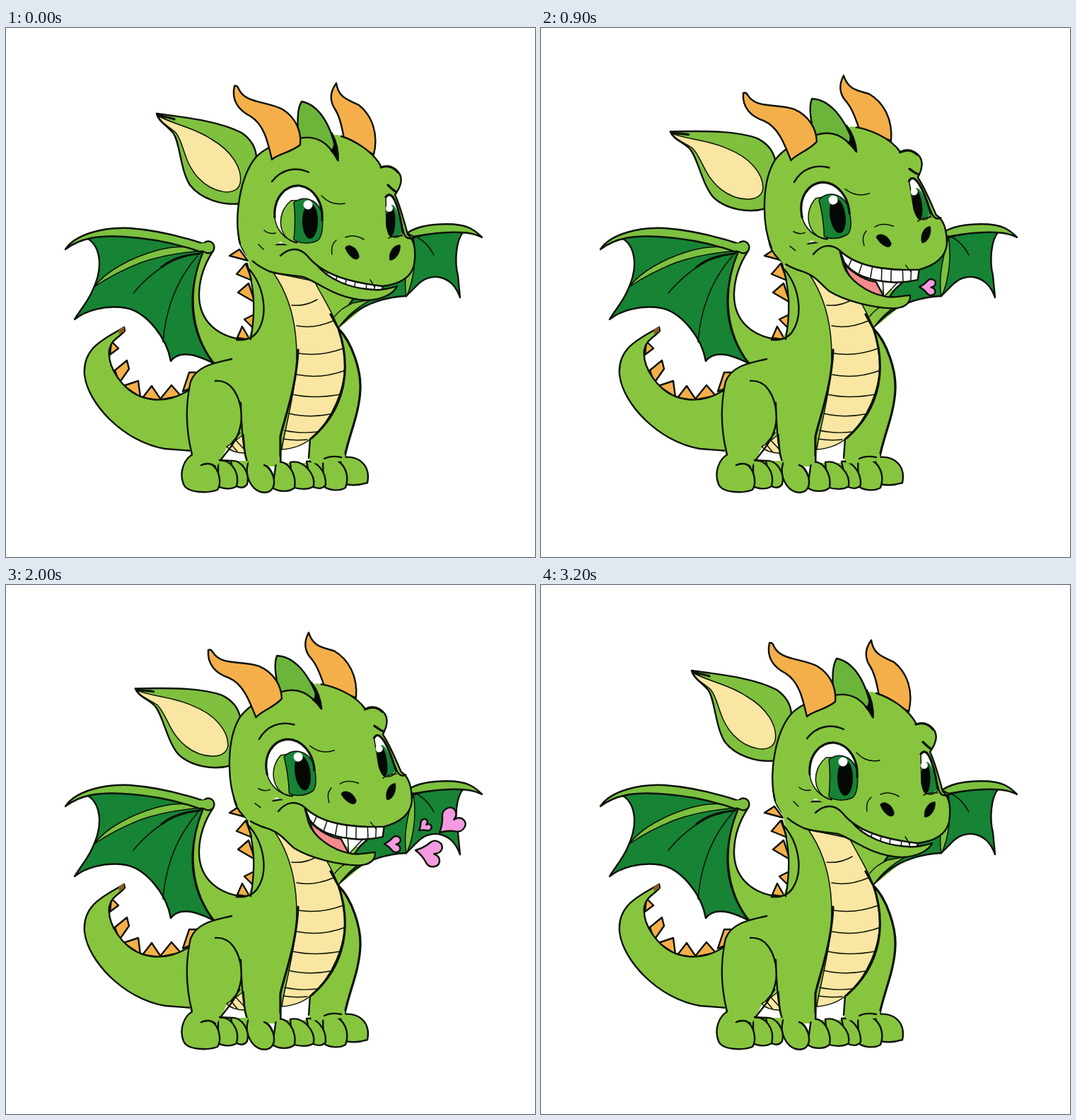
Animation of 748 by 748 pixels, one loop 3310 ms. Source, as an HTML page:

```html
<!DOCTYPE html>
<html lang="en">
<head>
<meta charset="utf-8">
<title>Little dragon</title>
<style>
  html, body { margin: 0; width: 100%; height: 100%; overflow: hidden; background: #fff; }
  svg { display: block; width: 100vw; height: 100vh; }
  path, circle, ellipse { stroke: #0c1207; stroke-width: 2.4; stroke-linejoin: round; stroke-linecap: round; }
  .skin { fill: #87c53f; }
  .rim { fill: #7cc140; }
  .ear { fill: #7fc03e; }
  .crest { fill: #6cb53b; }
  .deep { fill: #178335; }
  .horn { fill: #f5af4a; }
  .cream { fill: #f9e6a2; }
  .white { fill: #fff; }
  .tongue { fill: #f58a8c; }
  .ink { fill: #050805; }
  .line { fill: none; }
  .thin { stroke-width: 1.5; }
  .bold { stroke-width: 3.2; }
  .bare { stroke: none; }
  .heart { fill: #f39be0; }
  .heart path { vector-effect: non-scaling-stroke; }
</style>
</head>
<body>
<svg viewBox="0 0 748 748">
  <!-- far wing -->
  <g>
    <path class="skin bare" d="M445 370L500 370L520 384L471 424L458 405Z"/>
    <path class="deep" d="M574 297C610 286 635 287 647 288C636 300 634 330 639 350L642 381C631 349 600 343 580 365L567 378Z"/>
    <path class="deep" d="M486 390L500 370L575 300L566 379C545 380 508 386 482 412L470 423Z"/>
    <path class="skin thin" d="M462 412C470 399 480 394 490 389L517 384C500 392 482 407 470 424Z"/>
    <path class="rim" d="M567 290C590 274 640 275 656 283C666 288 670 293 673 296C655 286 620 287 576 295Z"/>
    <path class="rim thin" d="M566 380C561 350 570 320 576 296C581 325 576 360 566 380Z"/>
    <path class="line thin" d="M582 296Q597 305 605 321"/>
  </g>

  <!-- tail -->
  <g>
    <path class="horn" d="M147 462L149 443L159 453ZM154 484L171 470L174 482L160 502ZM166 506L187 499L190 522ZM193 523L206 506L220 527ZM217 526L234 505L247 520ZM250 514L259 487L273 487L264 508Z"/>
    <path class="skin" d="M167 423C143 438 108 450 111 490C115 530 165 585 225 595L264 598L260 511C235 528 210 528 190 521C165 511 143 480 146 455C149 440 160 438 168 428Z"/>
    <path class="bare" fill="#8a5a20" d="M159 427L167 422L167 429L160 433Z"/>
  </g>

  <path class="horn" d="M316 322L330 313L342 329ZM326 348L339 333L348 357ZM328 374L343 361L352 388ZM337 412L353 404L353 428ZM327 438L334 422L345 441Z"/>

  <!-- near wing -->
  <g>
    <path class="deep" d="M112 296C132 305 140 335 122 372C115 388 104 400 97 412C112 400 140 391 170 396C200 402 228 440 233 471C245 455 270 462 293 474C262 432 252 380 280 315C230 290 170 285 112 296Z"/>
    <path class="rim thin" d="M125 366C140 345 175 325 215 314C240 308 262 308 279 315C250 317 220 321 190 332C165 342 145 352 125 366Z"/>
    <path class="rim" d="M84 313C98 291 140 281 175 283C215 286 255 297 279 305L276 317C240 304 200 297 165 295C130 293 105 297 84 313Z"/>
    <path class="line bold" d="M274 319C252 321 235 326 220 338"/>
    <path class="line thin" d="M236 329C215 340 195 357 180 375M271 322C242 355 226 395 222 444"/>
    <path class="skin" d="M279 316C256 370 260 430 294 474L330 466L340 441C300 438 272 415 273 375C274 350 283 330 293 315Z"/>
    <circle class="rim" cx="286" cy="310" r="8.5"/>
    <path class="bare rim" d="M270 305L283 304V316L270 313Z"/>
  </g>

  <!-- body -->
  <g>
    <path class="skin bare" d="M335 300C348 345 354 385 350 410C349 425 345 435 340 441L320 442L294 474C275 480 262 490 258 515C252 545 256 575 262 608L300 618L313 592L335 600L342 620H388L390 596C405 595 420 590 429 582V612H478C484 575 499 550 501 510C502 485 490 445 470 425L445 350Z"/>
    <path class="cream thin" d="M378 346L436 358C455 395 475 420 479 465C482 510 460 555 432 580C420 590 405 595 390 596C392 580 400 550 405 520C415 470 416 400 378 346Z"/>
    <path class="cream thin" d="M312 592C322 586 330 579 336 575L338 601C327 601 318 599 312 592Z"/>
    <path class="line thin" d="M404 392Q423 394 440 384M411 421Q435 426 463 414M413 460Q445 465 477 453M411 490Q445 497 480 484M405 518Q435 525 473 518M400 545Q428 552 458 546M394 569Q415 574 441 571M392 581Q408 584 426 582M318 588L327 599M325 583L337 596"/>
    <path class="line" d="M341 333C350 365 354 395 346 440M343 340C365 365 372 405 355 430C350 437 342 442 326 441"/>
    <path class="line bold" d="M459 405L470 425C490 445 502 485 501 510C500 545 485 575 479 606M470 425C487 475 484 535 432 580M413 455C411 510 391 560 388 578V617"/>
    <path class="line" d="M319 468C300 473 270 476 261 500C252 540 256 575 263 603M296 499C325 497 336 535 332 560C328 585 312 598 303 612M332 530C333 570 336 600 342 616M430 581L428 608"/>
    <path class="line thin" d="M331 572C327 578 322 582 318 588"/>
  </g>

  <!-- feet -->
  <g class="skin">
    <path class="bare" d="M296 612H342V634H296ZM380 615H482V634H380Z"/>
    <path d="M472 608C498 602 516 618 511 643C500 647 490 647 480 645Z"/>
    <path d="M448 609C470 603 489 625 480 650C470 656 455 653 449 648Z"/>
    <path d="M425 613C438 611 453 626 452 646C447 653 438 651 432 648Z"/>
    <path d="M402 614C420 610 438 630 435 648C428 653 415 653 405 649Z"/>
    <path d="M382 614C400 610 411 632 408 650C400 657 385 656 377 650Z"/>
    <path d="M342 616C337 634 347 652 360 656C373 659 380 652 379 640C378 629 372 621 365 618"/>
    <path d="M318 612C334 610 345 630 341 645C337 651 330 651 325 647Z"/>
    <path d="M300 612C318 609 331 628 326 648C318 653 307 652 300 648Z"/>
    <path d="M266 602C250 609 245 630 251 645C256 658 286 658 299 653C305 644 302 625 292 618C286 615 280 616 276 618"/>
    <path class="bare" d="M264 596H302L303 612L298 620L264 614ZM343 606H387V616L366 621L344 621ZM430 602H479L480 612L432 616Z"/>
    <path class="line" d="M276 618Q287 613 296 620M365 618Q373 620 377 632M302 611L318 612M450 609Q460 604 474 607"/>
  </g>

  <g id="head">
    <path class="ear" d="M213 121C250 126 300 131 333 148C346 157 353 168 354 182L333 248C305 252 275 241 260 222C246 200 246 160 236 148C228 138 215 132 213 121Z"/>
    <path class="cream thin" d="M215 124C235 136 265 140 290 157C320 174 335 200 331 220C325 240 292 233 272 212C250 188 252 162 240 148C230 139 219 134 215 124Z"/>
    <path class="line bold" d="M214 122C221 126 230 126 238 129"/>

    <!-- mouth: the jaw hides tongue and teeth when shut -->
    <path class="white thin" d="M500 366L506 367L490 364Z" data-open="M478 396L506 374L480 372Z"/>
    <path class="tongue" d="M441 340C450 350 460 357 470 361L478 366C460 361 446 352 441 340Z" data-open="M430 342C440 358 459 371 470 373L478 395C451 388 432 369 430 342Z"/>
    <path class="white" d="M426 322C448 350 490 360 533 365L529 379C516 380 506 379 497 378C465 372 440 360 430 340Z"/>
    <path class="line thin" d="M440 338L435 346M454 346L448 358M468 352L463 367M481 356L478 373M494 359L491 377M510 361L508 379M522 363L519 379"/>
    <path class="skin" d="M329 290C328 312 345 332 372 344C390 350 405 349 420 352C440 358 465 383 510 385C535 384 549 374 553 365C545 368 530 371 520 370C490 369 455 357 437 332L425 306L345 306Z" data-open="M329 290C327 315 345 333 372 345C388 354 392 365 403 377C423 394 461 409 489 414C506 416 515 409 515 399C505 398 493 400 481 396C454 387 432 364 428 343L424 306L345 306Z"/>

    <path class="horn" d="M467 78C456 93 459 106 466 116C474 129 475 143 478 156L520 179C527 150 518 124 499 109C482 101 470 98 467 78Z"/>
    <path class="skin bare" d="M331 305C322 270 330 210 354 182C370 166 395 158 420 154L468 151C490 156 519 173 531 197C545 192 562 203 558 220C556 229 552 232 550 236C557 250 562 270 568 292C578 300 580 315 577 335C573 352 557 362 533 365C490 360 448 350 426 322L388 302L345 331Z"/>
    <path class="crest" d="M414 156C411 130 413 112 418 104C440 108 461 133 469 187C456 162 440 151 414 156Z"/>
    <path class="line" d="M331 305C322 270 330 210 354 182C360 176 366 172 374 168M474 153C490 158 519 173 531 197C545 192 562 203 558 220C556 229 552 232 550 236C557 250 562 270 568 292C578 300 580 315 577 335C573 352 557 362 533 365C490 360 448 350 426 322C414 309 400 311 388 322"/>
    <path class="ink thin" d="M461 148C466 157 471 172 470 188C467 182 463 177 459 173C466 171 464 158 461 148Z"/>
    <path class="line bold" d="M530 197Q545 192 554 204"/>
    <path class="horn" d="M323 82C318 103 330 117 346 125C365 137 370 160 376 186C385 178 403 176 416 165C418 146 410 127 391 115C368 103 338 107 329 86Q327 81 323 82Z"/>

    <!-- near eye -->
    <path class="white bare" d="M380 268C378 240 395 222 415 223C436 226 449 248 448 275L440 300C412 308 384 295 380 268Z"/>
    <path class="skin thin" d="M411 304C384 298 381 262 403 244L418 244Z"/>
    <path class="deep thin" d="M407 247C417 237 440 239 447 263C449 285 446 297 440 301C428 306 415 305 407 299Q410 270 407 247Z"/>
    <ellipse class="ink bare" cx="430" cy="273" rx="11" ry="25"/>
    <circle class="white bare" cx="427" cy="250" r="6.5"/>
    <path class="line bold" d="M380 268C378 240 395 222 415 223C436 226 449 248 447 272"/>
    <path class="line thin" d="M380 268C382 285 394 300 411 303M446 237Q460 252 479 248M365 286Q372 292 381 290M357 306L364 313"/>
    <path class="line" d="M376 217C390 199 410 196 428 204"/>

    <!-- far eye -->
    <path class="white thin" d="M537 238C546 227 555 250 561 290C553 300 541 298 538 280Z"/>
    <path class="deep bare" d="M539 258C546 242 554 250 560 289C553 298 542 297 539 280Z"/>
    <ellipse class="ink bare" cx="544" cy="273" rx="6.5" ry="22"/>
    <circle class="white bare" cx="542" cy="255" r="5"/>
    <path class="line bold" d="M537 239C546 227 555 250 561 288M552 232Q548 230 540 222"/>

    <!-- nose -->
    <path class="ink thin" d="M480 311C482 305 496 308 499 323C497 331 486 325 480 311ZM557 307C548 307 541 318 543 328C550 328 558 318 557 307Z"/>
    <path class="line thin" d="M461 320C459 307 464 303 467 300M480 296Q492 291 506 299M541 297Q550 293 561 294M515 356L521 366"/>
    <path class="line" d="M561 284C563 296 568 299 574 297"/>
  </g>

  <g id="hearts"></g>
</svg>
<script>
const LOOP = 3310, STEP = 100, LAST = 3200;
const OPEN_MS = 400, SHUT_MS = 300;
const TILT = -8.3, NECK = '373 342';
const FIRST_HEART = 600, HEART_GAP = 400, HEARTS_END = 2700;
const GROW = [.15, .6, 1];
const HEART = 'M0 0C.25-.12.38-.25.5-.4C.65-.58 1.02-.5.98-.22C.95-.06.82-.02.72 0C.82.02.95.06.98.22C1.02.5.65.58.5.4C.38.25.25.12 0 0Z';

// tip position, angle, size
const hearts = [
  { x: 535, y: 366, turn: 2, size: 23 },
  { x: 584, y: 347, turn: -38, size: 18 },
  { x: 579, y: 375, turn: 11, size: 37 },
  { x: 613, y: 350, turn: -42, size: 38 }
];

const head = document.getElementById('head');
const make = (name, parent) =>
  parent.appendChild(document.createElementNS('http://www.w3.org/2000/svg', name));

const numbers = d => d.match(/[\d.]+/g).map(Number);
const morphs = [...document.querySelectorAll('[data-open]')].map(node => {
  const shape = node.getAttribute('d');
  return { node, shape, from: numbers(shape), to: numbers(node.dataset.open) };
});

for (const h of hearts) {
  h.node = make('g', document.getElementById('hearts'));
  h.node.setAttribute('class', 'heart');
  make('path', h.node).setAttribute('d', HEART);
}

function poseHead(open) {
  head.setAttribute('transform', `rotate(${TILT * open} ${NECK})`);
  for (const m of morphs) {
    let i = 0;
    const mix = () => (m.from[i] + (m.to[i++] - m.from[i - 1]) * open).toFixed(2);
    m.node.setAttribute('d', m.shape.replace(/[\d.]+/g, mix));
  }
}

function poseHeart(h, index, tick) {
  const age = (tick - FIRST_HEART - index * HEART_GAP) / STEP;
  const on = age >= 0 && tick < HEARTS_END;
  h.node.style.display = on ? '' : 'none';
  if (!on) return;
  const scale = h.size * GROW[Math.min(age, GROW.length - 1)];
  h.node.setAttribute('transform', `translate(${h.x} ${h.y}) rotate(${h.turn}) scale(${scale})`);
}

function draw(time) {
  const tick = Math.min(Math.floor(time / STEP) * STEP, LAST);
  poseHead(Math.min(tick / OPEN_MS, (LAST - tick) / SHUT_MS, 1));
  hearts.forEach((h, i) => poseHeart(h, i, tick));
}

const start = performance.now();
function frame() {
  draw((performance.now() - start) % LOOP);
  requestAnimationFrame(frame);
}
frame();
</script>
</body>
</html>
```
